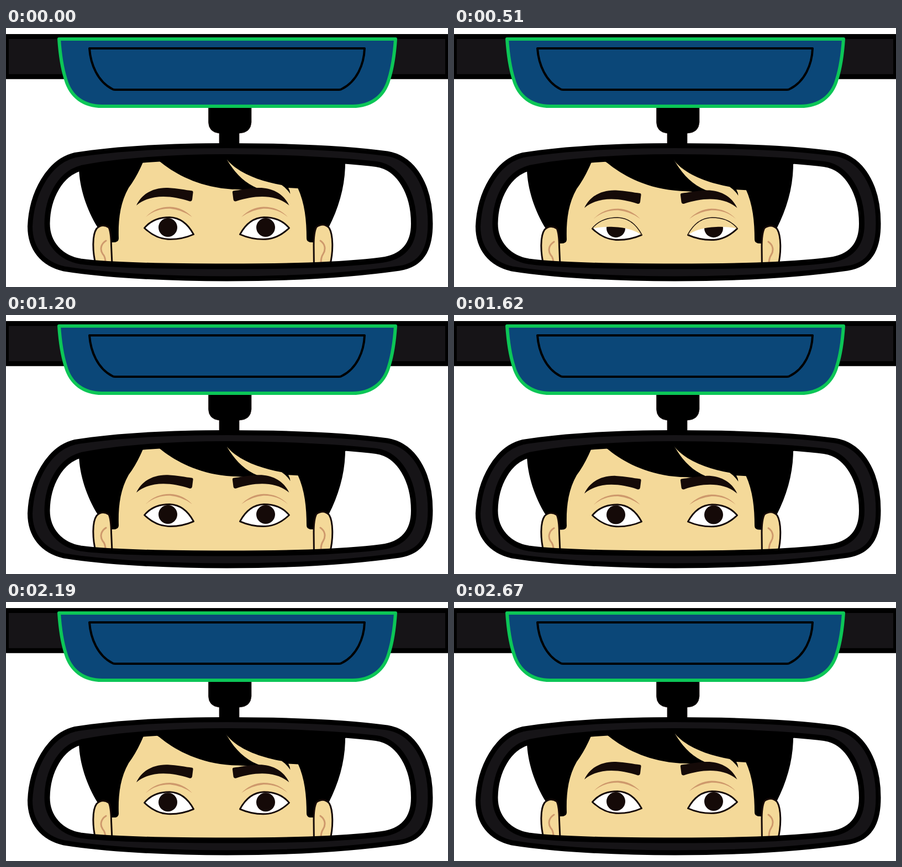
An HTML page for the animation above (2.7 s loop, 800x470 px).

```html
<!DOCTYPE html>
<html lang="en">
<head>
<meta charset="utf-8">
<title>Rear-view mirror</title>
<style>
  html, body { margin: 0; width: 100%; height: 100%; overflow: hidden; background: #fff; }
  svg { display: block; }
  .ink { fill: #150a08; }
  .skin { fill: #f4d999; }
  .shade { fill: #ce996c; }
  .ear { fill: #f4d999; stroke: #150a08; stroke-width: 3; }
  .crease { fill: none; stroke: #ce996c; stroke-width: 3; stroke-linecap: round; }
</style>
</head>
<body>
<svg width="800" height="470" viewBox="0 0 800 470" stroke-linejoin="round">
  <defs>
    <path id="glass" d="M400 234C500 234 610 240 670 247C712 253 738 300 738 355C738 395 717 416 680 421C600 431 500 432.5 400 432.5C290 432.5 190 431 135 423.5C98 417 74.5 390 74.5 355C75 308 98 264 137 254C200 241 300 234 400 234Z"/>
    <path id="eyeShape" d="M250.5 363C262 349 277 343.5 296 343.5C315 344 329 355 339.5 374.5C327 380 310 384 293 383.3C277 382.5 263 375 250.5 363Z"/>
    <clipPath id="inGlass"><use href="#glass"/></clipPath>
    <clipPath id="inEye"><use href="#eyeShape"/></clipPath>
    <g id="eye">
      <use href="#eyeShape" fill="#fff"/>
      <circle class="ink" cx="293" cy="362" r="17"/>
      <use href="#eyeShape" fill="none" stroke="#150a08" stroke-width="2.9"/>
      <path id="lid" class="skin" clip-path="url(#inEye)"/>
    </g>
    <path id="fold" class="shade" d="M253 343Q270 324.5 297 324.5Q320 325.5 337 343Q318 329.5 297 327.7Q272 327 253 343Z"/>
    <path id="brow" class="ink" d="M236 322C246 300 268 289 293 290C310 291 325 294 337 295.5Q339 296 338.5 299L337 311Q336 316 331 314C300 304 262 300 236 322Z"/>
  </defs>

  <!-- roof and sensor housing -->
  <rect x=".5" y="15.5" width="799" height="72.8" fill="#161417" stroke="#000" stroke-width="9"/>
  <path d="M366.5 142H444V171Q443 190 422 191V213H386V191Q367 189 366.5 171Z" stroke="#231815" stroke-width=".7"/>
  <path d="M96 20H705C703 50 699 74 693 93C684 125 660 142 627 142H174C141 142 117 125 108 93C102 74 98 50 96 20Z" fill="#0b4778" stroke="#0cc657" stroke-width="6"/>
  <path d="M151 37H649C648 66 635 97 608 110.500Q606 112 603 112H197Q194 112 192 110.500C166 97 153 66 151 37Z" fill="none" stroke="#000" stroke-width="4"/>

  <!-- mirror -->
  <path d="M400 213.5C520 213.5 620 218.5 690 228C737 236 768 285 768 355C768 402 752 430 712 436C620 449 520 455 400 455C290 455 180 449 105 437C66 428 43.5 400 43.5 360C46 300 77 242 125 230.5C200 218.5 300 213.5 400 213.5Z" fill="#161417" stroke="#000" stroke-width="9"/>
  <use href="#glass" fill="#fff"/>
  <g clip-path="url(#inGlass)">
    <g id="head">
      <path d="M132 220V255C133 290 146 330 166 362L176 389H574L584 362C603 325 614 285 614 245V220Z"/>
      <path class="skin" d="M191 450V389Q204 390 204 382C203 350 206 318 222 290Q237 270 249 241L254 225H520L528 290C541 318 544 350 544 382Q544 390 557 389V450Z"/>
      <path class="ear" d="M163 432C156 405 156 375 164 364Q174 354 186 362Q190 370 190.500 395L192.500 440"/>
      <path class="ear" d="M586 432C593 405 592 375 585 363Q575 352 562 361Q557 370 557 395L557.500 440"/>
      <path class="crease" d="M181 386C171 392 170 403 175 410Q180 415 180 426M569 386C578 392 579 402 574 410Q570 416 570 426"/>
    </g>
    <g id="eyes">
      <use href="#eye"/>
      <use href="#eye" transform="matrix(-1 0 0 1 763 0)"/>
    </g>
    <g id="folds">
      <use href="#fold"/>
      <use href="#fold" transform="matrix(-1 0 0 1 763 0)"/>
    </g>
    <g id="fringe">
      <path d="M254 226L278 242C302 262 350 292 420 293Q445 295 464 294C435 285 415 265 400 239L394 226Z"/>
      <path d="M392 226L400 239C421 264 460 278 499 285Q508 291 514.500 301Q514 295 511 290L529 291L545 310V226Z"/>
    </g>
    <g id="brows">
      <use href="#brow"/>
      <use href="#brow" transform="matrix(-1 0 0 1 748.500 0)"/>
    </g>
  </g>
  <use href="#glass" fill="none" stroke="#000" stroke-width="10"/>
</svg>
<script>
const LOOP = 2700, NOD = LOOP / 2;
const travel = { head: 2.2, eyes: 1.3, folds: 3.6, fringe: 3.6, brows: 5.2 };
const el = id => document.getElementById(id);

const ease = (t, from, to) => {
  const u = Math.min(1, Math.max(0, (t - from) / (to - from)));
  return u * u * (3 - 2 * u);
};

function draw(now) {
  const t = now % LOOP, phase = t % NOD;
  const drop = ease(phase, 0, 660) - ease(phase, 920, 1240);
  for (const id in travel)
    el(id).setAttribute('transform', `translate(0 ${travel[id] * drop})`);

  // one slow blink, during the first nod only
  const shut = ease(t, 210, 790) - ease(t, 830, 1140);
  const y = 330 + 52 * shut;
  el('lid').setAttribute('d', `M250 363V335H340V375C318 ${y} 272 ${y} 250 363Z`);
  el('lid').style.display = shut > 0 ? '' : 'none';
}

const start = performance.now();
function tick() {
  draw(performance.now() - start);
  requestAnimationFrame(tick);
}
tick();
</script>
</body>
</html>
```
